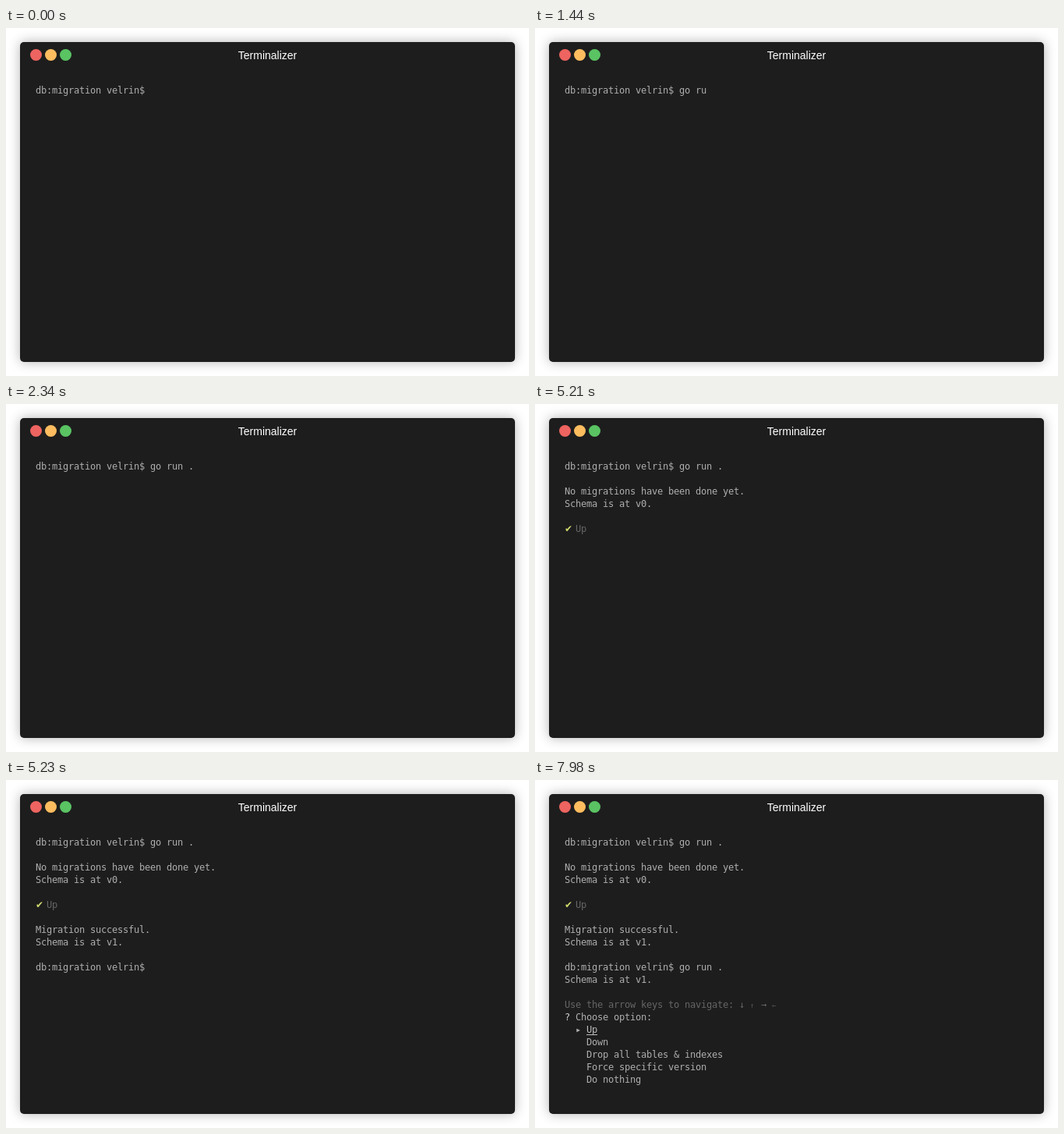
Write an HTML page that moves like this. It is 671x446 px and loops after 8000 ms.

```html
<!DOCTYPE html>
<html lang="en">
<head>
<meta charset="utf-8">
<title>Terminal</title>
<style>
  html, body { margin: 0; width: 100%; height: 100%; overflow: hidden; background: #fff; }

  .window {
    position: absolute; left: 18px; top: 18px; width: 635px; height: 410px;
    border-radius: 5px; background: #1d1d1d;
    box-shadow: 0 0 15px rgba(0, 0, 0, .3);
  }
  .title {
    position: absolute; inset: 9px 0 auto; text-align: center; color: #fff;
    font: 14px/16px "Liberation Sans", Arial, sans-serif;
  }
  .dot {
    position: absolute; left: 13px; top: 9px; width: 15px; height: 15px;
    border-radius: 50%; background: #ee6460;
  }
  .dot.min { left: 32px; background: #fdbd5f; }
  .dot.max { left: 51px; background: #5ac463; }

  .screen {
    position: absolute; left: 20px; top: 54px; color: #afafaf;
    font: 12px/16px "DejaVu Sans Mono", monospace;
    letter-spacing: calc(7px - 1ch);
    font-variant-ligatures: none;
  }
  .block { position: absolute; left: 0; top: calc(var(--row) * 16px); white-space: pre; }
  .dim { color: #666; }
  .ask { color: #d0d0d0; }
  .pick { color: #bcbcbc; box-shadow: inset 0 -1px #bcbcbc; }
  .cell { display: inline-block; width: 7px; line-height: 0; letter-spacing: 0; }
  .small { font-size: 9px; color: #585858; }
  .tick { color: #d2dc70; font-family: "DejaVu Sans", sans-serif; }

  /* Every change is a hard cut on one shared 8 s clock. */
  .typed, .menu, .intro, .chosen, .done, .again, .rerun {
    animation: 8s step-end infinite;
  }
  .typed {
    display: inline-block; height: 16px; overflow: hidden; vertical-align: top;
    animation-name: type;
  }
  .intro  { animation-name: intro; }
  .menu   { animation-name: menu; }
  .chosen { animation-name: chosen; }
  .done   { animation-name: done; }
  .again  { animation-name: again; }
  .rerun  { animation-name: rerun; }

  @keyframes type {
    0% { width: 0; }
    11.875% { width: 7px; }
    12.875% { width: 14px; }
    16.75% { width: 28px; }
    18% { width: 35px; }
    20.5% { width: 42px; }
    29.25%, 100% { width: 56px; }
  }
  @keyframes intro  { 0% { visibility: hidden; } 40.125%, 100% { visibility: visible; } }
  @keyframes chosen { 0% { visibility: hidden; } 65.125%, 100% { visibility: visible; } }
  @keyframes done   { 0% { visibility: hidden; } 65.375%, 100% { visibility: visible; } }
  @keyframes again  { 0% { visibility: hidden; } 86.25%, 100% { visibility: visible; } }
  @keyframes rerun  { 0% { visibility: hidden; } 99.75%, 100% { visibility: visible; } }
  @keyframes menu {
    0% { visibility: hidden; top: 80px; }
    40.125% { visibility: visible; top: 80px; }
    65.125% { visibility: hidden; top: 80px; }
    99.75%, 100% { visibility: visible; top: 208px; }
  }
</style>
</head>
<body>
<div class="window">
  <i class="dot"></i><i class="dot min"></i><i class="dot max"></i>
  <div class="title">Terminalizer</div>
  <div class="screen">
    <div class="block" style="--row:0">db:migration velrin$ <span class="typed">go run .</span></div>
    <div class="block intro" style="--row:2">No migrations have been done yet.
Schema is at v0.</div>
    <div class="block chosen" style="--row:5"><span class="cell tick">✔</span> <span class="dim">Up</span></div>
    <div class="block done" style="--row:7">Migration successful.
Schema is at v1.

db:migration velrin$ <span class="again">go run .</span></div>
    <div class="block rerun" style="--row:11">Schema is at v1.</div>
    <div class="block menu" style="--row:5"><span class="dim">Use the arrow keys to navigate: <span class="cell">↓</span> <span class="cell small">↑</span> <span class="cell">→</span> <span class="cell small">←</span></span>
<span class="ask">?</span> Choose option:
  <span class="cell">▸</span> <span class="pick">Up</span>
    Down
    Drop all tables &amp; indexes
    Force specific version
    Do nothing</div>
  </div>
</div>
</body>
</html>
```
